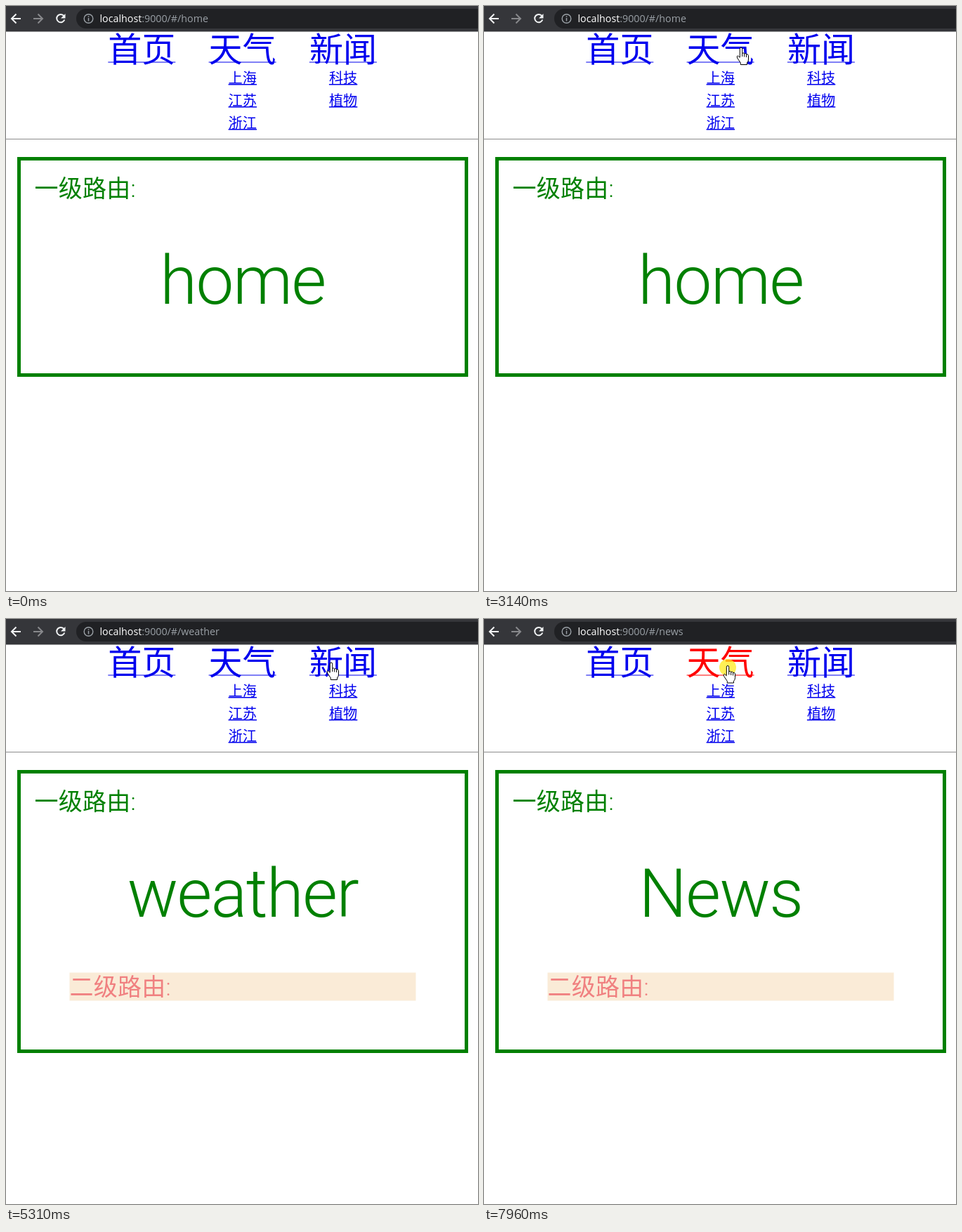
An HTML page for the animation above (8000 ms loop, 672 by 833 pixels).

```html
<!DOCTYPE html>
<html lang="zh">
<head>
<meta charset="utf-8">
<title>Router</title>
<style>
  html, body { margin: 0; width: 100%; height: 100%; overflow: hidden; background: #fff; }
  svg { display: block; }
  .cjk { font-family: Roboto, "Noto Sans CJK SC", "Noto Sans CJK", sans-serif; font-weight: 300; }
  .label { font-size: 34px; letter-spacing: .25px; }
  .url { font: 14.25px "Open Sans", sans-serif; }
  .title { font: 300 96px Roboto, sans-serif; letter-spacing: -1.5px; fill: green; text-anchor: middle; }
  .icon { fill: none; stroke-width: 2; }
  .pointer { fill: #fff; stroke: #000; stroke-linejoin: round; }
</style>
</head>
<body>
<svg width="672" height="833" viewBox="0 0 672 833">
  <rect width="672" height="36.5" fill="#35363a"/>
  <rect id="omnibox" x="100" y="4" width="600" height="28" rx="14"/>
  <path class="icon" stroke="#f1f3f4" d="M21 18H8.5M14.5 11.5L8 18l6.5 6.5"/>
  <path class="icon" stroke="#87888b" d="M39 18h12.5M45.5 11.5L52 18l-6.5 6.5"/>
  <path class="icon" stroke="#f1f3f4" d="M82.5 14.2A5.7 5.7 0 1 0 83.3 19.5"/>
  <path fill="#f1f3f4" d="M84.5 11v6.5H78z"/>
  <circle cx="117.5" cy="18" r="6.3" fill="none" stroke="#9aa0a6" stroke-width="1.4"/>
  <path stroke="#9aa0a6" stroke-width="1.5" d="M117.5 17v4.5M117.5 14.2v1.6"/>
  <text class="url" x="133.5" y="23" fill="#9aa0a6"><tspan fill="#fff">localhost</tspan>:9000/#/<tspan id="path"></tspan></text>

  <g id="menu" class="cjk" fill="#0000ee"></g>
  <rect y="189" width="672" height="1" fill="#8c8c8c"/>

  <rect id="frame" x="18.5" y="217.5" width="637" fill="none" stroke="green" stroke-width="5"/>
  <text class="cjk label" x="40.5" y="271.5" fill="green">一级路由:</text>
  <text id="title" class="title" x="337" y="424"></text>
  <g id="child">
    <rect x="90.5" y="503.5" width="493" height="40" fill="#faebd7"/>
    <text class="cjk label" x="90.5" y="535.5" fill="#f08080">二级路由:</text>
  </g>

  <g id="cursor">
    <circle id="press" cy="2.5" r="12" fill="#ffeb1e" opacity=".75"/>
    <path id="arrow" class="pointer" d="M0 0V16.5L3.8 13L6.3 18.8L8.8 17.7L6.3 12H11.6Z"/>
    <path id="hand" class="pointer" d="M-1.7 14V2Q-1.7 0 0 0T1.7 2V8.5Q3.2 6.8 4.7 9Q6.2 7.6 7.6 9.8Q9.7 9 10.5 11.5V17Q10.5 20 8.5 22V24.5H-.7V22L-5.4 15Q-6.5 12 -4.5 11.8L-1.7 14.5M1.7 8.5V13M4.7 9V13.5M7.6 9.8V14"/>
    <path id="beam" fill="none" stroke="#e8e8e8" d="M-3.5 -7.5H3.5M0 -7.5V7.5M-3.5 7.5H3.5"/>
  </g>
</svg>
<script>
const LOOP = 8000, HOLD = 110;
const el = id => document.getElementById(id);
const show = (id, on) => el(id).setAttribute('visibility', on ? 'visible' : 'hidden');

const menu = [
  { label: '首页', title: 'home', items: [] },
  { label: '天气', title: 'weather', items: ['上海', '江苏', '浙江'] },
  { label: '新闻', title: 'News', items: ['科技', '植物'] }
];
const columnLeft = i => 145.3 + 143.3 * i;

function link(label, x, middle, size, underline, thickness) {
  return `<g><text x="${x}" y="${middle + size * 0.33}" font-size="${size}">${label}</text>
    <rect x="${x}" y="${middle + underline}" width="${size * 2}" height="${thickness}"/></g>`;
}
el('menu').innerHTML = menu.map(({ label, items }, i) =>
  link(label, columnLeft(i), 63.5, 48, 16, 1) +
  items.map((item, row) => link(item, columnLeft(i) + 28, 103 + 32 * row, 20.2, 8, 1.5)).join('')
).join('');
const mainLinks = menu.map(({ label }) =>
  [...el('menu').children].find(node => node.textContent.includes(label)));

// Mouse-up time and menu column; each press lasts HOLD.
const clicks = [[2390, 0], [3520, 1], [5910, 2], [6900, 1], [7480, 2], [LOOP + 60, 1]];

// Pointer moves: start, end, destination.
const entry = { x: 641, y: 278 };
const moves = [
  [1760, 2240, 211, 67],
  [2720, 3140, 366, 59],
  [3820, 3960, 115, 18],
  [3960, 4130, 300, 18],
  [4300, 4610, 330, 18],
  [4800, 4960, 104, 18],
  [4960, 5310, 463, 62],
  [6440, 6680, 343.5, 61],
  [6940, 7240, 466, 66],
  [7520, 7930, 347, 66.5]
];

const ease = u => u * u * (3 - 2 * u);
const progress = (t, from, to) => ease(Math.min(1, Math.max(0, (t - from) / (to - from))));

const pointerAt = t => moves.reduce(({ x, y }, [from, to, toX, toY]) => {
  const k = progress(t, from, to);
  return { x: x + (toX - x) * k, y: y + (toY - y) * k };
}, entry);

const overMenu = ({ x, y }) => y > 38 && y < 90 &&
  menu.some((_, i) => x > columnLeft(i) && x < columnLeft(i) + 96);

function draw(t) {
  const column = clicks.findLast(([time]) => time <= t)?.[1] ?? 0;
  const { title } = menu[column];
  el('path').textContent = title.toLowerCase();
  el('title').textContent = title;
  el('frame').setAttribute('height', column ? 398 : 308);
  show('child', column);

  const pressed = clicks.find(([time]) => t >= time - HOLD && t < time);
  mainLinks.forEach((node, i) =>
    node.setAttribute('fill', pressed?.[1] === i ? '#f00' : '#0000ee'));

  const pointer = pointerAt(t);
  const visible = t >= moves[0][0];
  const beam = pointer.y < 33 && pointer.x > 125;
  const hand = overMenu(pointer);
  el('omnibox').setAttribute('fill', pointer.y < 33 ? '#28292c' : '#202124');
  el('cursor').setAttribute('transform', `translate(${pointer.x} ${pointer.y})`);
  show('press', visible && pressed);
  show('beam', visible && beam);
  show('hand', visible && hand);
  show('arrow', visible && !beam && !hand);
}

function tick() {
  draw(performance.now() % LOOP);
  requestAnimationFrame(tick);
}
tick();
</script>
</body>
</html>
```
